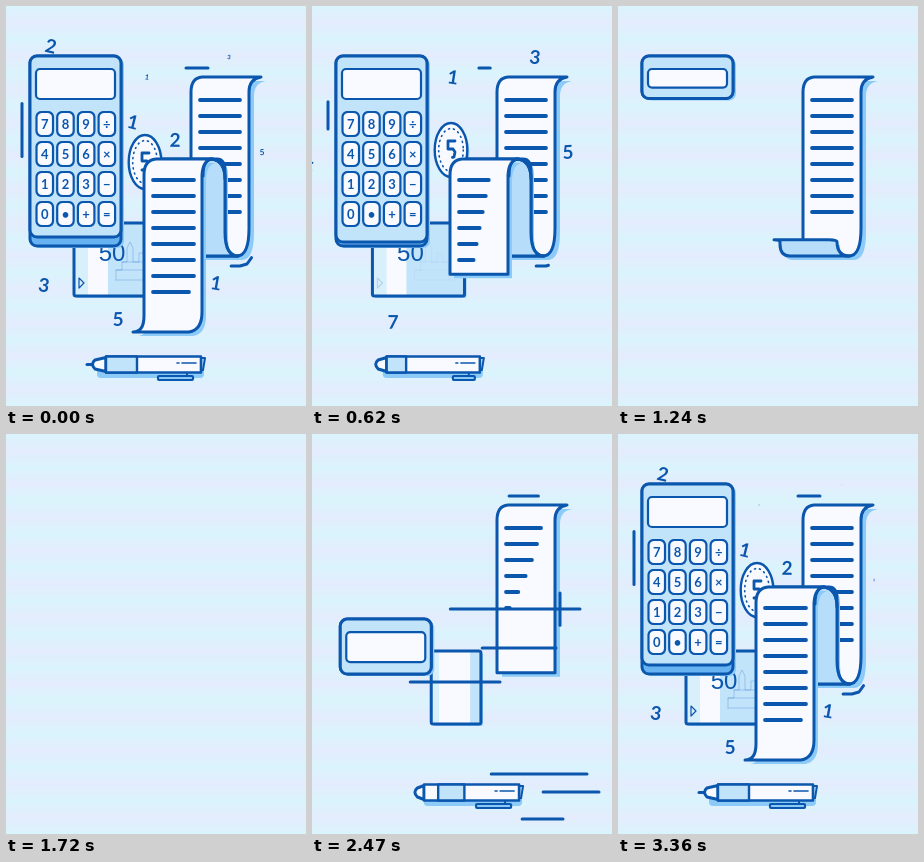
Recreate the animation shown at these times as an HTML page with a canvas. Size 300 by 400 pixels, loop 3.43 s.

```html
<!DOCTYPE html>
<html lang="en">
<head>
<meta charset="utf-8">
<title>Calculator and receipt</title>
<style>
html, body { margin: 0; height: 100%; overflow: hidden; background: #dff1fc; }
canvas { display: block; width: 100vw; height: 100vh; }
</style>
</head>
<body>
<canvas id="stage" width="300" height="400"></canvas>
<script>
const ctx = document.getElementById('stage').getContext('2d');
const LOOP = 3430, STEP = LOOP / 50;
const INK = '#0b57ae', PALE = '#c2e4fb', FOLD = '#b6defb', MID = '#8ccaf8', WHITE = '#f8faff';

const clamp = x => Math.max(0, Math.min(1, x));
const lerp = (a, b, k) => a + (b - a) * k;
const ramp = (u, start, time) => clamp((u - start) / time);
const easeOut = x => 1 - (1 - x) ** 2;
const smooth = x => x * x * (3 - 2 * x);

function paint(path, fill, width = 3) {
  if (fill) { ctx.fillStyle = fill; ctx.fill(path); }
  if (width) { ctx.lineWidth = width; ctx.strokeStyle = INK; ctx.stroke(path); }
}

function shadow(path, dx, dy) {
  ctx.save();
  ctx.translate(dx, dy);
  paint(path, MID, 0);
  ctx.restore();
}

function box(x, y, w, h, r) {
  const p = new Path2D();
  p.roundRect(x, y, Math.max(w, 0), Math.max(h, 0), r);
  return p;
}

const line = (x1, y1, x2, y2, width = 3) =>
  paint(new Path2D(`M${x1},${y1}L${x2},${y2}`), null, width);

// part of a polyline between the lengths a and b
function trim(pts, a, b) {
  const p = new Path2D();
  let s = 0, open = false;
  for (let i = 1; i < pts.length; i++) {
    const [x, y] = pts[i - 1], [X, Y] = pts[i];
    const d = Math.hypot(X - x, Y - y);
    const from = Math.max(a - s, 0), to = Math.min(b - s, d);
    if (d && to > from) {
      if (!open) p.moveTo(lerp(x, X, from / d), lerp(y, Y, from / d));
      p.lineTo(lerp(x, X, to / d), lerp(y, Y, to / d));
      open = true;
    }
    s += d;
  }
  return p;
}

function roundPoints(x, y, w, h, r) {
  const pts = [];
  for (let c = 0; c < 4; c++) {
    const cx = c === 1 || c === 2 ? x + w - r : x + r;
    const cy = c > 1 ? y + h - r : y + r;
    for (let k = 0; k <= 4; k++) {
      const a = Math.PI * (1 + c / 2 + k / 8);
      pts.push([cx + r * Math.cos(a), cy + r * Math.sin(a)]);
    }
  }
  return [...pts, pts[0]];
}

function text(s, x, y, size, scale = 1, turn = 0, font = 'bold', family = 'Lato, sans-serif') {
  ctx.save();
  ctx.translate(x, y);
  ctx.rotate(turn);
  ctx.scale(scale, scale);
  ctx.font = `${font} ${size}px ${family}`;
  ctx.fillStyle = INK;
  ctx.fillText(s, 0, size * 0.36);
  ctx.restore();
}

function background() {
  const g = ctx.createLinearGradient(0, 0, 0, 400);
  for (let i = 0; i <= 24; i++) g.addColorStop(i / 24, i % 2 ? '#e4ecfd' : '#daf4fc');
  ctx.fillStyle = g;
  ctx.fillRect(0, 0, 300, 400);
}

function card(u) {
  const k = easeOut(ramp(u, 2300, 510)), e = ramp(u, 3770, 880);
  if (!k || e === 1) return;
  const l = lerp(183, 68, k) - 24 * e, r = lerp(lerp(185, 156, k), 44, e ** 3);
  const shape = box(l, 217, r - l, 73, 2);
  shadow(shape, 2, 2);
  paint(shape, PALE, 0);
  ctx.save();
  ctx.clip(shape);
  ctx.fillStyle = '#d8effc';
  ctx.fillRect(l, 217, 14 * k, 73);
  ctx.fillStyle = WHITE;
  ctx.fillRect(l + 14 * k, 217, lerp(45, 20, k), 73);
  text('50', l + 38, 246, 24, ramp(u, 2650, 150) - ramp(u, 4100, 500), 0, '', 'Liberation Sans, Arial, sans-serif');
  const show = ramp(u, 2700, 300) - ramp(u, 3800, 300), x = l + 42;
  ctx.globalAlpha = show;
  paint(new Path2D(`M${l + 5},272l5,5l-5,5z`), null, 1.2);
  ctx.globalAlpha = 0.3 * show;
  paint(new Path2D(`M${x},274v-10h6v-8h5v-14l3,-6l3,6v14h6v-9h5v9h6v18M${x},274h40M${x},264h40M${x + 6},256h28`), null, 0.8);
  ctx.restore();
  paint(shape);
}

function calculator(u) {
  const k = smooth(ramp(u, 2238, 652)), e = smooth(ramp(u, 4200, 670));
  if (!k || e === 1) return;
  const x = 24 + 6 * (1 - k), top = 240 - 190 * k, base = 240 - 190 * e;
  const face = base - 9 * (ramp(u, 2890, 200) - ramp(u, 3770, 500));
  const body = box(x, top, 91, base - top, 7);
  shadow(body, 3, 2);
  paint(body, '#67b3f2');
  paint(box(x, top, 91, face - top, 7), PALE);
  const h = Math.min(30, face - top - 24);
  if (h > 3) paint(box(x + 6, top + 13, 79, h, 4), WHITE, 2.2);
  [...'789÷456×123−0•+='].forEach((s, i) => {
    const row = i >> 2, kx = x + 6.5 + (i % 4) * 20.7, ky = top + 56 + row * 30;
    const p = ramp(u, 2480 + 55 * row, 380) - ramp(u, 4080, 480);
    if (p <= 0 || ky + 24 > face + 6) return;
    paint(trim(roundPoints(kx, ky, 16.5, 24, 5), 0, 76 * p), WHITE, 2.2);
    if (p > 0.8) text(s, kx + 8.2, ky + 12, 13, (p - 0.8) * 5);
  });
}

function rules(x, y0, limit, width) {
  for (let i = 0; i < 8; i++) {
    const y = y0 + i * 16, w = width(i);
    if (w > 0 && y < limit - 4) line(x, y, x + w, y, 3.8);
  }
}

// the paper comes down, curls up behind and folds over to the front
function backSheet(u) {
  const k = easeOut(ramp(u, 2020, 600)) - smooth(ramp(u, 4690, 350));
  if (k <= 0) return;
  const b = 71 + 179 * k, start = Math.min(86, b);
  const foot = k === 1 ? 'V222Q243,250 231,250' : `V${b}`;
  const shape = new Path2D(`M185,${b}V${start}Q185,72 196,71H255Q243,73 243,${start}${foot}H185`);
  shadow(shape, 5, 4);
  paint(shape, WHITE);
  rules(194, 94, b, i => 40 * easeOut(ramp(u, 2243 + 42 * i, 350)));
}

function underside(u) {
  const k = ramp(u, 2620, 200) - ramp(u, 4540, 150);
  if (k <= 0) return;
  const y = 250 - 97 * k, r = 12 * k;
  const shape = new Path2D(`M156,${y}H211Q219,${y} 219,${y + r}V${Math.max(226, y + r)}Q219,250 232,250H172Q162,250 162,${Math.max(238, y + r)}V${y + r}Q162,${y} 156,${y}`);
  shadow(shape, 3, 4);
  paint(shape, FOLD);
}

function frontSheet(u) {
  const k = ramp(u, 2850, 280) - ramp(u, 3800, 740);
  if (k <= 0) return;
  const b = 153 + 173 * k, r = 16 * Math.min(1, 4 * k), c = clamp(6 * k - 5);
  paint(new Path2D('M197,170Q197,153 206,153Q219,155 219,173V226Q219,250 232,250H197'), FOLD);
  const shape = new Path2D(`M206,153H150Q138,154 138,${153 + r}V${b - 16 * c}Q138,${b} ${138 - 11 * c},${b}H${196 - 13 * c}Q196,${b - 2 * c} 196,${b - 20 * c}V${153 + r}Q197,154 206,153`);
  shadow(shape, 4, 4);
  paint(new Path2D('M197,170Q197,153 206,153Q219,155 219,173'));
  paint(shape, WHITE);
  rules(147, 174, b - 10, i => (i < 7 ? 41 : 36) *
    (easeOut(ramp(u, 2940 + 25 * i, 220)) - ramp(u, 3900 - 40 * i, 540)));
}

function coin(u) {
  const s = ramp(u, 2700, 100) - ramp(u, 4430, 200);
  if (s <= 0) return;
  const y = 124 + 32 * (ramp(u, 2810, 280) - ramp(u, 3800, 660));
  const ring = (rx, ry) => {
    const p = new Path2D();
    p.ellipse(139, y, rx * s, ry * s, 0, 0, 7);
    return p;
  };
  const inked = ramp(u, 2820, 130), disc = ring(16.3, 27);
  if (inked) shadow(disc, 2, 2);
  paint(disc, WHITE, 2.4 * inked);
  if (!inked) return;
  ctx.setLineDash([1, 4.2]);
  paint(ring(12.3, 21.5), null, 1.6 * inked);
  ctx.setLineDash([]);
  const five = [[4, -9], [-3, -9], [-3, -1], [2, -1], [4, 2], [3, 7], [-3, 8]]
    .map(([a, b]) => [139 + a, y + b]);
  paint(trim(five, 0, 36 * (ramp(u, 2900, 300) - ramp(u, 3950, 620))), null, 2.8);
}

function pen(u) {
  const k = easeOut(ramp(u, 2130, 560)), e = ramp(u, 3720, 700) ** 1.3;
  if (!k || e === 1) return;
  const l = lerp(178, 100, k) - 68 * e;
  const r = l + 95 * (ramp(u, 2130, 200) - e ** 4);
  const nib = ramp(u, 2400, 250) - ramp(u, 3900, 350);
  const grip = l + 91 * (1 - k), hold = Math.min(31 * k * (1 - e), r - grip);
  const clip = 35 * (1 - e), end = lerp(r - 8, r, e);
  const body = box(l, 350.5, r - l, 16, 0);
  shadow(box(l - 12 * nib, 352, r - l + 12 * nib, 14, 4), 3, 6);
  paint(box(end - clip, 370, clip, 4, 1), MID, 2.2);
  if (nib > 0) {
    line(end - 6, 367, end - 6, 370, 2);
    const x = l - 8 - 6 * nib;
    paint(new Path2D(`M${l},351.5L${x + 3},354Q${x - 2},358 ${x + 3},363L${l},365.5z`), WHITE);
    if (nib > 0.6) line(x, 358.5, x - 5, 358.5, 3);
    paint(new Path2D(`M${r},352h4l-2,12h-2z`), PALE, 2);
  }
  paint(body, WHITE, 2.6);
  if (hold > 1) paint(box(grip, 350.5, hold, 16, 0), PALE, 2.4);
  if (r - l > 70) {
    line(r - 24, 357, r - 22, 357, 1.6);
    line(r - 19, 357, r - 5, 357, 1.6);
  }
}

// a dash that slides in fast along a path, lingers at mid, then drifts off and shrinks
function dash(u, pts, mid, from, drift, length, start = 2300) {
  const q = 1 - ramp(u, start, 3360 - start), e = ramp(u, 3430, 1000) ** 1.5;
  if (q === 1 || e === 1) return;
  const s = mid + from * q ** 3 + drift * e;
  const half = length / 2 * (1 + 0.4 * q) * (1 - e) * ramp(u, start, 100);
  paint(trim(pts, s - half, s + half));
}

// a line that shoots out from its start and follows its own head away
function streak(u, x, y, X, Y, start) {
  const head = ramp(u, start, 160), tail = ramp(u, start + 170, 200);
  if (head && tail < 1) line(lerp(x, X, tail), lerp(y, Y, tail), lerp(x, X, head), lerp(y, Y, head));
}

function trails(u) {
  dash(u, [[300, 62], [0, 62]], 109, -35, 38, 22);
  dash(u, [[16, 400], [16, 0]], 276, -150, 30, 53, 2600);
  dash(u, [[248, 100], [248, 243], [246, 251], [241, 258], [234, 260], [195, 260]], 164, -150, 14, 24);
  [[175, 268, 130], [214, 244, 74], [248, 188, 90], [340, 275, 96], [358, 287, 56], [385, 251, 41]]
    .forEach(([y, x, w]) => streak(u, x, y, x - w, y, 2310));
  streak(u, 123, 120, 123, 12, 2645);
}

function digits(u) {
  // sign, x, y, birth
  [['2', 45, 40, 2700], ['1', 127, 116, 2810], ['3', 38, 279, 2950], ['5', 112, 313, 2950],
   ['2', 169, 134, 3000], ['1', 210, 277, 3000], ['5', 256, 146, 3320], ['1', 141, 71, 3335],
   ['3', 223, 51, 3350], ['7', 81, 316, 3450], ['5', -4, 162, 3500]
  ].forEach(([s, x, y, birth]) => {
    const age = ramp(u, birth, 1000);
    text(s, x, y, 19, Math.min(1, 4 * age, 4 - 4 * age), 0.1 + 0.15 * Math.sin(x));
  });
}

function draw() {
  const t = Math.floor((performance.now() % LOOP + 4) / STEP) % 50 * STEP;
  const u = t < 1700 ? t + LOOP : t; // runs from one empty stage to the next
  ctx.lineCap = ctx.lineJoin = 'round';
  ctx.textAlign = 'center';
  background();
  [card, calculator, backSheet, coin, underside, frontSheet, pen, trails, digits].forEach(part => part(u));
  requestAnimationFrame(draw);
}
draw();
</script>
</body>
</html>
```
